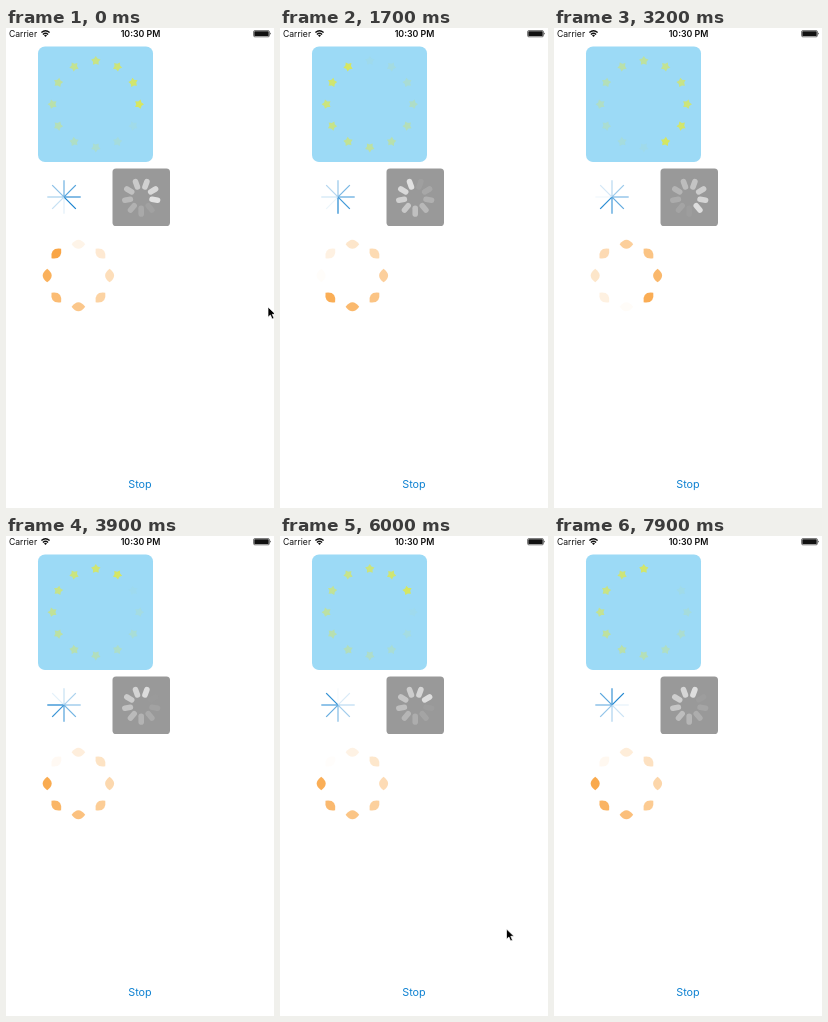
These frames come from a looping animation (268 px wide and 480 px high, 8000 ms). An HTML page:

```html
<!DOCTYPE html>
<html lang="en">
<head>
<meta charset="utf-8">
<title>Activity indicators</title>
<style>
  html, body { margin: 0; width: 100%; height: 100%; overflow: hidden; background: #fff; }
  svg { display: block; width: 268px; height: 480px; }
  text { font-family: Inter, Roboto, sans-serif; }
</style>
</head>
<body>
<svg id="stage" viewBox="0 0 268 480" xmlns="http://www.w3.org/2000/svg">
  <rect width="268" height="480" fill="#fff"/>

  <g fill="#111">
    <text x="3" y="8.9" font-size="8.6">Carrier</text>
    <text x="134.5" y="8.9" font-size="8.8" font-weight="600" text-anchor="middle">10:30 PM</text>
    <g fill="none" stroke="#111" stroke-width="1.3">
      <path d="M35.4 4.6Q39.5 .9 43.6 4.6"/>
      <path d="M36.9 6.4Q39.5 4 42.1 6.4"/>
    </g>
    <path d="M38 7.5Q39.5 6.2 41 7.5L39.5 9.1Z"/>
    <rect x="247.6" y="2.6" width="15.8" height="6.2" rx="1.2" fill="none" stroke="#111" stroke-width=".6"/>
    <rect x="248.3" y="3.3" width="14.4" height="4.8" rx=".6"/>
    <path d="M264 4.6Q265.4 5.7 264 6.8Z"/>
  </g>

  <rect x="32" y="18.5" width="115" height="115.5" rx="7" fill="#9cdaf6"/>
  <rect x="106.5" y="140.5" width="57.5" height="57.5" rx="3.6" fill="#999"/>
  <g id="spinners"></g>

  <text x="134" y="460.4" font-size="10.8" fill="#0f82d2" text-anchor="middle">Stop</text>
  <path id="cursor" d="M0 0V10.2L2.4 8L4.1 12L6 11.2L4.3 7.3H7.5Z" fill="#000" stroke="#fff" stroke-width=".7"/>
</svg>

<script>
const LOOP = 8000, TICK = 100;
const SLOWDOWN = 1.009;
const SVG_NS = "http://www.w3.org/2000/svg";
const spinnerLayer = document.getElementById("spinners");
const cursor = document.getElementById("cursor");

function starPath(outer, inner) {
  const points = Array.from({ length: 10 }, (_, i) => {
    const r = i % 2 ? inner : outer, a = i * Math.PI / 5;
    return `${(r * Math.sin(a)).toFixed(2)} ${(-r * Math.cos(a)).toFixed(2)}`;
  });
  return `M${points.join("L")}Z`;
}

// phase: lit index at time zero; rate: indices per second
const spinners = [
  { x: 89.8, y: 76.2, radius: 43.3, count: 12, offset: 0, phase: 3.03, rate: 12 / SLOWDOWN,
    d: starPath(4.9, 2.9), fill: "#d6e660" },
  { x: 58, y: 169, radius: 0, count: 8, offset: 0, phase: 3, rate: 0.78,
    d: "M0 -.5V-16.7", stroke: "#1782cf" },
  { x: 135.2, y: 169.3, radius: 13.8, count: 9, offset: 20, phase: 2.01, rate: 9 / SLOWDOWN,
    d: "M0 -2.8V2.8", stroke: "#e2e2e2", width: 5.6, cap: "round" },
  { x: 72.4, y: 247.5, radius: 31.2, count: 8, offset: 0, phase: 7.04, rate: 4 / SLOWDOWN,
    d: "M-6.8 0Q0 -9 6.8 0Q0 9 -6.8 0Z", fill: "#f9a544" },
];

for (const s of spinners) {
  s.parts = Array.from({ length: s.count }, (_, i) => {
    const part = document.createElementNS(SVG_NS, "path");
    const attributes = {
      d: s.d,
      fill: s.fill || "none",
      stroke: s.stroke || "none",
      "stroke-width": s.width || 1.2,
      "stroke-linecap": s.cap || "butt",
      transform: `translate(${s.x} ${s.y}) rotate(${s.offset + i * 360 / s.count}) translate(0 ${-s.radius})`,
    };
    for (const name in attributes) part.setAttribute(name, attributes[name]);
    spinnerLayer.append(part);
    return part;
  });
}

// Pointer visits: [time, x, y] stops
const visits = [
  [[0, 262, 279], [100, 266, 279], [200, 270, 279]],
  [[4200, 216, 408], [4500, 198, 390], [4800, 198, 390], [5400, 206, 392],
   [6000, 226.5, 393], [6300, 229, 396], [6800, 229, 397]],
];

function pointerAt(time) {
  for (const stops of visits) {
    for (let i = 1; i < stops.length; i++) {
      const [t0, x0, y0] = stops[i - 1], [t1, x1, y1] = stops[i];
      if (time < t0 || time >= t1) continue;
      const k = (time - t0) / (t1 - t0);
      return [x0 + (x1 - x0) * k, y0 + (y1 - y0) * k];
    }
  }
  return null;
}

function render(time) {
  for (const s of spinners) {
    const head = s.phase + s.rate * time / 1000;
    s.parts.forEach((part, i) => {
      const age = (head - i + s.count) % s.count;
      part.setAttribute("opacity", (1 - age / s.count).toFixed(3));
    });
  }
  const position = pointerAt(time);
  cursor.setAttribute("visibility", position ? "visible" : "hidden");
  if (position) cursor.setAttribute("transform", `translate(${position})`);
}

const start = performance.now();
function frame() {
  const elapsed = (performance.now() - start) % LOOP;
  render(Math.floor(elapsed / TICK) * TICK);
  requestAnimationFrame(frame);
}
frame();
</script>
</body>
</html>
```
